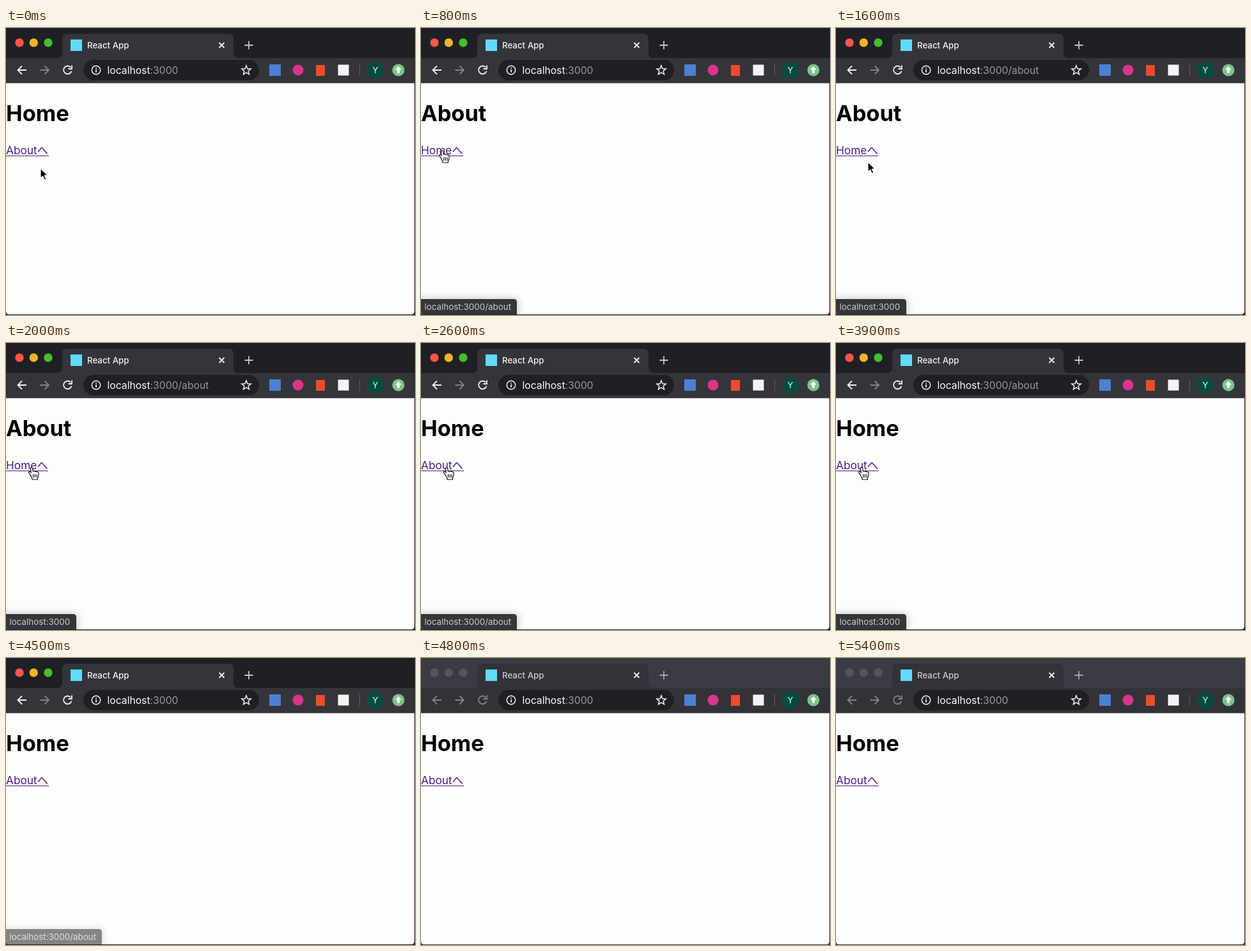
An HTML page that plays this animation: 640 px wide and 450 px high, repeating every 5500 ms.

```html
<!DOCTYPE html>
<html lang="ja">
<head>
<meta charset="utf-8">
<title>Router demo</title>
<style>
  html, body { margin: 0; width: 100%; height: 100%; overflow: hidden; background: #1f2025; }
  svg { display: block; width: 640px; height: 450px; }
  text { font-family: Inter, "Noto Sans CJK JP", "Noto Sans CJK", sans-serif; white-space: pre; }
  .frame { fill: #1f2025; }
  .bar { fill: #34353a; }
  .line { fill: none; stroke: #f1f1f3; stroke-width: 1.8; }
  .dim { stroke: #828387; }
  .soft { stroke: #c4c5c9; }
  .title { fill: #f1f1f3; }
  .idle .frame { fill: #3b3c43; }
  .idle .bar { fill: #323338; }
  .idle .nav .line { stroke: #828387; }
  .idle .soft { stroke: #a6a7ab; }
  .idle .light { fill: #54555c; }
  .idle .title { fill: #c9cacd; }
</style>
</head>
<body>
<svg id="win" viewBox="0 0 640 450">
  <defs>
    <filter id="blur" x="-20%" y="-80%" width="140%" height="260%"><feGaussianBlur stdDeviation="6"/></filter>
    <clipPath id="view"><path d="M0 86.5H639V444q0 5-5 5H5q-5 0-5-5Z"/></clipPath>
  </defs>

  <rect class="frame" width="640" height="450"/>
  <path class="bar" d="M80 47q8 0 8-8V17q0-8 8-8H348q8 0 8 8V39q0 8 8 8H640V87H0V47Z"/>
  <circle class="light" cx="21" cy="23" r="6.7" fill="#fb5549"/>
  <circle class="light" cx="43.3" cy="23" r="6.7" fill="#eeb524"/>
  <circle class="light" cx="66" cy="23" r="6.7" fill="#45bf2b"/>
  <rect x="101" y="18" width="18" height="18" fill="#61dafb"/>
  <text class="title" x="127" y="32" font-size="13.3" font-weight="500">React App</text>
  <path class="line" d="M333.5 23l8 8m0-8l-8 8"/>
  <path class="line soft" d="M380 20.5v13m-6.5-6.5h13"/>

  <g class="nav">
    <path class="line" d="M32 66H18.5M25 59.5L18.5 66l6.5 6.5"/>
    <path class="line dim" d="M53.5 66H67M60.5 59.5L67 66l-6.5 6.5"/>
    <path class="line" d="M101.3 61.8A6.3 6.3 0 1 0 102.5 67.5M103 58.5v5.5h-5.5"/>
  </g>
  <rect x="121" y="50" width="275" height="32" rx="16" fill="#1f2024"/>
  <circle class="line" cx="141" cy="66" r="6.7" style="stroke-width:1.5"/>
  <path class="line" d="M141 65v4.5m0-7.5v1.6"/>
  <text x="158.5" y="72" font-size="15.7" fill="#fbfbfb">localhost<tspan id="url" fill="#97989c"></tspan></text>
  <path id="star" class="line" style="stroke-width:1.5"/>

  <rect x="412" y="57" width="18" height="18" fill="#4b80d5"/>
  <circle cx="457" cy="66" r="8.5" fill="#db348c"/>
  <rect x="485" y="58" width="14" height="17" fill="#f04a2a"/>
  <rect x="519.5" y="57.5" width="17" height="17" fill="#f4f4f4"/>
  <path d="M553.5 57v18" stroke="#5d5e63"/>
  <circle cx="578" cy="66" r="13" fill="#034d40"/>
  <text x="578" y="70.6" font-size="13" text-anchor="middle" fill="#f6f6f6">Y</text>
  <circle cx="614" cy="66" r="9.5" fill="#7cc48a"/>
  <path d="M614 60l5 5.5h-3v5h-4v-5h-3Z" fill="#fff"/>

  <g clip-path="url(#view)">
    <rect y="86" width="640" height="364" fill="#fdfdfd"/>
    <text id="head" x="0" y="146" font-size="34.4" font-weight="700" fill="#000"></text>
    <text id="link" x="0" y="198" font-size="17.3" fill="#4c1c85"></text>
    <rect id="under" y="200" height="1" fill="#4c1c85"/>
    <g id="status">
      <rect id="glow" x="-6" y="424" height="36" fill="#000" opacity=".2" filter="url(#blur)"/>
      <path id="bubble" fill="#35363a"/>
      <text id="target" x="5.5" y="442" font-size="13.4" fill="#c8c9cc"></text>
    </g>
  </g>

  <path id="arrow" d="M0 0V15.5L3.7 12.2L6.2 18L8.9 16.8L6.4 11.2H11.3Z" fill="#000" stroke="#fff" stroke-width="1.2" stroke-linejoin="round"/>
  <g id="hand" stroke="#111" stroke-width="1.2" stroke-linejoin="round" stroke-linecap="round">
    <path fill="#fff" d="M-1.5 12L-4.3 8.6Q-5 6.9-3.4 6.5Q-2.3 6.4-.7 8.3L-1.6 2Q-1.5 .2 0 .2Q1.3 .3 1.6 2L2.3 6.2Q4.3 4.8 5.5 6.5Q7.4 5.5 8.5 7.2Q10.6 6.7 11 8.8V12.5Q10.7 15 9.4 16.5V19H.9V17Q-.7 14.7-1.5 12Z"/>
    <path fill="none" d="M2.6 11v4.5m2.7-4.5v4.5m2.7-4.5v4.5"/>
  </g>
</svg>

<script>
const LOOP = 5500, STEP = 100;
const $ = id => document.getElementById(id);
const clicks = [800, 2100, 3200, 3900];
const URL_LAG = 100, STATUS_LAG = 200, IDLE_AT = 4700;

// [time, x, y] of the pointer's hot spot
const path = [
  [100, 54, 220], [400, 36, 195], [600, 33, 192], [1300, 33, 192],
  [1500, 50, 210], [1700, 50, 210], [1900, 40, 195], [2200, 40, 195],
  [2400, 50, 211], [2600, 40, 195], [4100, 40, 195], [4200, 60, 176],
  [4400, 330, -30]
];
// [time, opacity] of the link preview
const fades = [[400, 0], [500, 1], [1700, 1], [1900, 0], [2000, 1], [4400, 1], [4500, 0.6], [4600, 0]];

function sample(keys, t) {
  const i = keys.findIndex(k => k[0] > t);
  if (i === 0) return keys[0].slice(1);
  if (i < 0) return keys[keys.length - 1].slice(1);
  const a = keys[i - 1], b = keys[i], u = (t - a[0]) / (b[0] - a[0]);
  return a.slice(1).map((v, n) => v + (b[n + 1] - v) * u);
}

const isAbout = t => clicks.filter(c => c <= t).length % 2 === 1;
const port = about => ':3000' + (about ? '/about' : '');

function star(cx, cy, outer, inner) {
  const points = Array.from({ length: 10 }, (_, i) => {
    const r = i % 2 ? inner : outer, a = (i / 5 - 0.5) * Math.PI;
    return `${cx + r * Math.cos(a)} ${cy + r * Math.sin(a)}`;
  });
  return `M${points.join('L')}Z`;
}

function render(t) {
  const about = isAbout(t), toAbout = !isAbout(t - STATUS_LAG);
  $('head').textContent = about ? 'About' : 'Home';
  $('link').textContent = about ? 'Homeへ' : 'Aboutへ';
  $('under').setAttribute('width', about ? 66 : 67);
  $('url').textContent = port(isAbout(t - URL_LAG));

  const width = toAbout ? 150 : 110;
  $('target').textContent = 'localhost' + port(toAbout);
  $('bubble').setAttribute('d', `M0 425H${width - 5}q5 0 5 5V450H0Z`);
  $('glow').setAttribute('width', width + 8);
  $('status').setAttribute('opacity', sample(fades, t)[0]);

  const [x, y] = sample(path, t);
  const hover = x < 68 && y > 180 && y < 204;
  for (const id of ['arrow', 'hand']) {
    $(id).setAttribute('transform', `translate(${x} ${y})`);
    $(id).style.display = (id === 'hand') === hover ? '' : 'none';
  }
  $('win').classList.toggle('idle', t >= IDLE_AT);
}

$('star').setAttribute('d', star(376, 66.5, 7.6, 3.3));
const start = performance.now();
function tick() {
  const t = (performance.now() - start) % LOOP;
  render(Math.floor(t / STEP) * STEP);
  requestAnimationFrame(tick);
}
tick();
</script>
</body>
</html>
```
